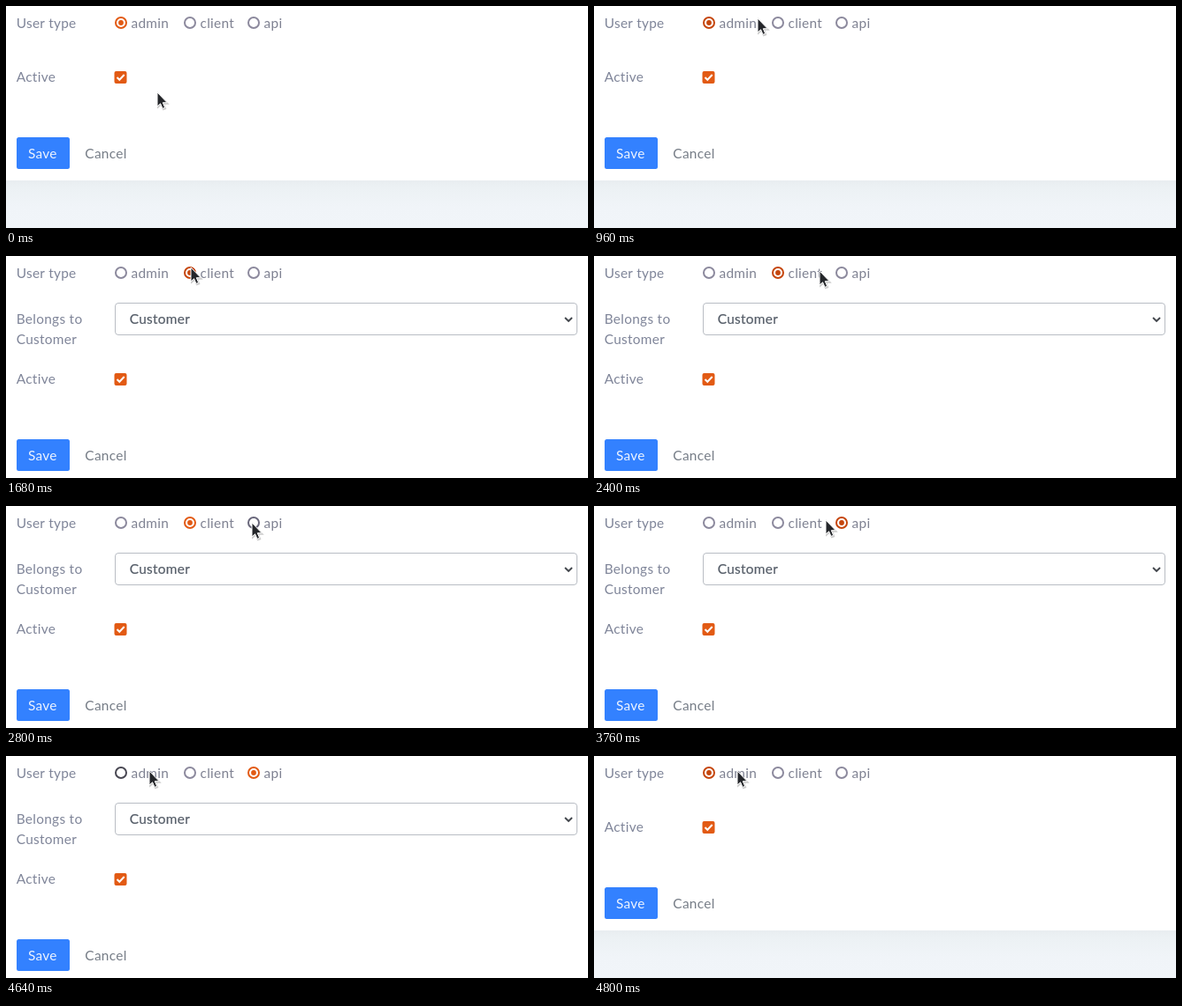
An HTML page for the animation above (4.88 s loop, 658 by 252 pixels).

```html
<!DOCTYPE html>
<html lang="en">
<head>
<meta charset="utf-8">
<title>User type form</title>
<style>
  html, body { margin: 0; width: 100%; height: 100%; overflow: hidden; background: #fff; }
  svg { display: block; width: 658px; height: 252px; }
  text { font: 15.4px Lato, "Open Sans", sans-serif; letter-spacing: .3px; fill: #7f8599; }
  .choice text { fill: #7f8292; }
  .choice circle:first-child { fill: #fff; stroke-width: 2; }
</style>
</head>
<body>
<svg viewBox="0 0 658 252">
  <defs>
    <linearGradient id="shade" x2="0" y2="1">
      <stop stop-color="#e8edf0"/>
      <stop offset=".15" stop-color="#ecf1f4"/>
      <stop offset=".55" stop-color="#f0f4f8"/>
      <stop offset="1" stop-color="#f1f5f9"/>
    </linearGradient>
    <path id="arrow" d="M0 0V16L3.6 12.8 6 18.4 8.7 17.3 6.3 11.7H11.2Z"/>
  </defs>
  <rect width="658" height="252" fill="#fff"/>
  <text x="11.7" y="25">User type</text>
  <g id="choices"></g>

  <g id="customer">
    <text x="11.7" y="77">Belongs to</text>
    <text x="11.7" y="100">Customer</text>
    <rect x="123.5" y="53.5" width="522" height="36" rx="3.5" fill="#fff" stroke="#b9bdc4"/>
    <text x="139.7" y="77" style="fill:#555d68;stroke:#555d68;stroke-width:.2">Customer</text>
    <path d="M632 70l4 4 4-4" fill="none" stroke="#42464c" stroke-width="1.9"/>
  </g>

  <g id="lower">
    <text x="11.7" y="86">Active</text>
    <rect x="122.5" y="74" width="14" height="14" rx="2" fill="#e25a14"/>
    <path d="M125.5 81l2.8 2.8 5.4-5.8" fill="none" stroke="#fff" stroke-width="2"/>
    <rect x="12" y="149" width="60" height="36" rx="2.5" fill="#3381ff"/>
    <text x="25" y="173" style="fill:#eef4ff">Save</text>
    <text x="89.3" y="173" style="fill:#767d87">Cancel</text>
    <rect y="198" width="658" height="54" fill="url(#shade)"/>
  </g>

  <g id="cursor">
    <use href="#arrow" x=".8" y="1.2" opacity=".2" stroke="#000" stroke-width="1.5"/>
    <use href="#arrow" fill="#24262a" stroke="#fff" stroke-linejoin="round"/>
  </g>
</svg>
<script>
const LOOP = 4880, STEP = 80, PRESS = 160;
const byId = id => document.getElementById(id);

// Straight pointer moves: when each begins, how many steps it takes, where it ends
const moves = [
  { start: 0, steps: 1, x: 171, y: 98 },
  { start: 160, steps: 3, x: 168, y: 26 },
  { start: 400, steps: 3, x: 300, y: 14 },
  { start: 960, steps: 1, x: 185, y: 14 },
  { start: 1040, steps: 3, x: 222, y: 13 },
  { start: 1360, steps: 1, x: 209, y: 13 },
  { start: 2240, steps: 6, x: 301, y: 20 },
  { start: 2720, steps: 2, x: 278, y: 19 },
  { start: 2880, steps: 1, x: 301, y: 17 },
  { start: 3040, steps: 1, x: 282, y: 16 },
  { start: 3760, steps: 5, x: 184, y: 18 },
  { start: 4160, steps: 1, x: 203, y: 16 },
  { start: 4320, steps: 3, x: 162, y: 17 }
];

// Each click selects a choice; the button goes down PRESS ms earlier
const clicks = [
  { time: 0, choice: 0 }, { time: 1680, choice: 1 },
  { time: 3200, choice: 2 }, { time: 4800, choice: 0 }
];
const chosenAt = t => clicks.findLast(c => c.time <= t).choice;

const choices = [
  { label: "admin", x: 130, end: 186 },
  { label: "client", x: 208, end: 258 },
  { label: "api", x: 280, end: 314 }
];
byId("choices").innerHTML = choices.map(c =>
  `<g class="choice"><circle cx="${c.x}" cy="19" r="6"/><circle cx="${c.x}" cy="19" r="2.9"/>
   <text x="${c.x + 11.5}" y="25">${c.label}</text></g>`).join("");
const radios = [...byId("choices").children];

function pointerAt(t) {
  const i = moves.findLastIndex(m => m.start <= t);
  const to = moves[i], from = moves[i - 1] ?? to;
  const p = Math.min(1, (Math.floor((t - to.start) / STEP) + 1) / to.steps);
  const mix = axis => Math.round(from[axis] + (to[axis] - from[axis]) * p);
  return { x: mix("x"), y: mix("y") };
}

function radioColor(on, down, hover) {
  if (on) return hover ? "#c5460d" : "#e25a14";
  return down ? "#484752" : hover ? "#69677b" : "#8c899d";
}

function draw(t) {
  const { x, y } = pointerAt(t);
  const selected = chosenAt(t), pressed = chosenAt(t + PRESS);
  choices.forEach((c, i) => {
    const hover = y < 36 && x >= c.x - 18 && x < c.end;
    const on = i === selected;
    const color = radioColor(on, i === pressed, hover);
    const [ring, dot] = radios[i].children;
    ring.setAttribute("stroke", color);
    dot.setAttribute("fill", on ? color : "none");
  });
  const open = selected !== 0;
  byId("customer").style.display = open ? "" : "none";
  byId("lower").setAttribute("transform", `translate(0 ${open ? 59 : 0})`);
  byId("cursor").setAttribute("transform", `translate(${x} ${y})`);
}

function frame() {
  draw(performance.now() % LOOP);
  requestAnimationFrame(frame);
}
frame();
</script>
</body>
</html>
```
